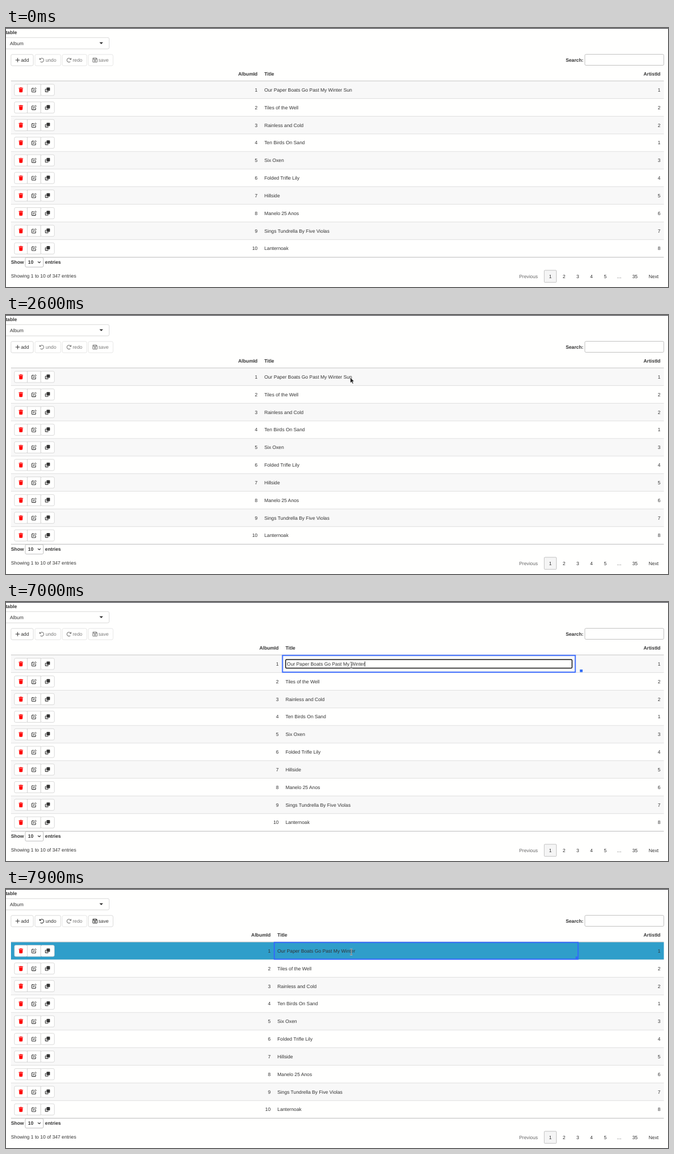
An HTML page that plays this animation: 1196x468 px, repeating every 8000 ms.

```html
<!DOCTYPE html>
<html lang="en">
<head>
<meta charset="utf-8">
<title>Editable table</title>
<style>
html, body { margin: 0; width: 100%; height: 100%; overflow: hidden; background: #fffffe; }
svg { display: block; width: 1196px; height: 468px; }
text {
  font: 8.73px "Liberation Sans", Arial, sans-serif;
  fill: #333;
  text-rendering: geometricPrecision;
  white-space: pre;
}
.b { font-weight: bold; }
.end { text-anchor: end; }
.mid { text-anchor: middle; }
.box { fill: #fffffe; stroke: #ccc; stroke-width: .75; }
.field { stroke: #aaa; }
.ico { fill: #333; }
.pen { fill: none; stroke: #333; stroke-width: 1.1; stroke-linejoin: round; }
.red { fill: #f00; }
.off { opacity: .65; }
.mark { fill: none; stroke: #36f; stroke-width: 1.9; }
.handle { fill: #316cf5; }
</style>
</head>
<body>
<svg id="stage" viewBox="0 0 1196 468" xmlns="http://www.w3.org/2000/svg">
  <defs>
    <g id="trash" class="red">
      <path d="M-3.9-3.9h2.3l.4-.7h2.4l.4.7h2.3v1.2h-7.8z"/>
      <path d="M-3.3-2.2h6.6l-.4 5.8q-.1.8-.9.8h-4q-.8 0-.9-.8z"/>
    </g>
    <g id="edit" class="pen">
      <path d="M-.4-3h-2.5q-1 0-1 1v4.9q0 1 1 1h4.9q1 0 1-1v-2.5"/>
      <path d="M-1.4 1.4l.4-1.9 3.6-3.6 1.5 1.5-3.6 3.6z" stroke-width=".9"/>
    </g>
    <g id="clone" class="ico">
      <rect x="-1.7" y="-4.3" width="6.1" height="6.1" rx="1"/>
      <path d="M-2.5-1.8h-.9q-1 0-1 1v4q0 1 1 1h4q1 0 1-1v-.8h-1.2v.6h-3.6v-3.6h.7z"/>
    </g>
    <path id="plus" class="pen" stroke-width="1.3" d="M-3.8 0h7.6M0-3.8v7.6"/>
    <path id="undo" class="pen" stroke-width="1.2" d="M-3.7-3.8v2.8h2.8M-3.2-1.3A3.6 3.6 0 1 1-2.4 2.6"/>
    <use id="redo" href="#undo" transform="scale(-1 1)"/>
    <g id="save" class="pen">
      <path d="M-3-3.8h5l1.8 1.8v4.9q0 .9-.9.9h-5.9q-.9 0-.9-.9v-5.8q0-.9.9-.9zM-2.1-3.6v2.5h4v-2.5"/>
      <circle cy="1.4" r=".8"/>
    </g>
  </defs>
</svg>
<script>
const NS = 'http://www.w3.org/2000/svg';
const stage = document.getElementById('stage');
const LOOP = 8000, TOP = 95.8, ROW = 31.83;
const FULL = 'Our Paper Boats Go Past My Winter Sun';
const titles = [FULL, 'Tiles of the Well', 'Rainless and Cold', 'Ten Birds On Sand', 'Six Oxen',
  'Folded Trifle Lily', 'Hillside', 'Manelo 25 Anos', 'Sings Tundrella By Five Violas', 'Lanternoak'];
const artists = [1, 2, 2, 1, 3, 4, 5, 6, 7, 8];

function add(tag, attrs, parent = stage) {
  const el = document.createElementNS(NS, tag);
  for (const k in attrs) el.setAttribute(k, attrs[k]);
  return parent.appendChild(el);
}
const rect = (x, y, width, height, attrs, parent) => add('rect', { x, y, width, height, ...attrs }, parent);
const path = (d, attrs, parent) => add('path', { d, ...attrs }, parent);
const icon = (name, x, y, parent) => add('use', { href: '#' + name, transform: `translate(${x} ${y})` }, parent);
function label(s, x, y, cls = '', parent = stage) {
  const el = add('text', { x, y, class: cls }, parent);
  el.textContent = s;
  return el;
}
const show = (el, on) => el.setAttribute('visibility', on ? 'visible' : 'hidden');
const move = (el, x, y) => el.setAttribute('transform', `translate(${x} ${y})`);

// Page head
rect(0, 0, 1196, 1.2, { fill: '#3b3b40' });
label('table', -.6, 10.5, 'b');
rect(-5, 17.3, 191.4, 20.5, { class: 'box', rx: 2.5 });
label('Album', 7, 30.8);
path('M168.8 25.8h6.6l-3.3 3.4z', { class: 'ico' });

// Toolbar
function button(name, x, w, iconX, textX) {
  const g = add('g', {});
  rect(x, 47.8, w, 20.4, { class: 'box', rx: 2.5 }, g);
  icon(name, iconX, 58, g);
  label(name === 'plus' ? 'add' : name, textX, 61, '', g);
  return g;
}
button('plus', 9, 40.3, 21, 27);
const undo = button('undo', 52.3, 46.6, 64.5, 71.4);
const redo = button('redo', 101.7, 44.3, 113.8, 120.4);
const save = button('save', 148.8, 44.6, 160.8, 167);
redo.setAttribute('class', 'off');
label('Search:', 1011.2, 60.6, 'b');
rect(1045.8, 47.6, 142.6, 19.8, { class: 'box field', rx: 2 });

// Table
for (let i = 0; i < 10; i += 2) rect(9, TOP + i * ROW, 1179.5, ROW, { fill: '#f8f8f8' });
for (let i = 1; i < 10; i++) rect(9, TOP + i * ROW - .4, 1179.5, .75, { fill: '#d6d6d6' });
const picked = rect(9, TOP + .3, 1179.5, ROW - .6, { fill: '#2f9eca' });
rect(9, TOP - .6, 1179.5, 1, { fill: '#c4c4c4' });
rect(9, TOP + 10 * ROW - .4, 1179.5, 1, { fill: '#b8b8b8' });
label('ArtistId', 1182.3, 86.3, 'b end');

const cols = add('g', {});
label('AlbumId', 454.4, 86.3, 'b end', cols);
label('Title', 466.7, 86.3, 'b', cols);
let firstTitle;
titles.forEach((title, i) => {
  const mid = TOP + (i + .5) * ROW, base = mid + 3.2;
  [[15.2, 23.6], [38.6, 24.3], [62.8, 24.6]].forEach(([x, w], k) => {
    rect(x, mid - 10.1, w, 20.4, { class: 'box', rx: k === 1 ? 0 : 2.5 });
  });
  icon('trash', 26.9, mid + .2);
  icon('edit', 50.6, mid + .2);
  icon('clone', 75, mid + .1);
  label(i + 1, 454.4, base, 'end', cols);
  const cell = label(title, 466.7, base, '', cols);
  if (!i) firstTitle = cell;
  label(artists[i], 1182.3, base, 'end');
});

// Cell editing
const outline = rect(461, 96.5, 580, 30.3, { class: 'mark' });
const handle = rect(0, 122, 4.9, 4.7, { class: 'handle' });
const editor = add('g', {});
rect(505.3, 103.9, 517.3, 15.6, { fill: '#fffffe', stroke: '#101010', 'stroke-width': 1.5, rx: 1.6 }, editor);
const typed = label(FULL, 507.6, TOP + ROW / 2 + 3.2, '', editor);
const caret = rect(0, 107.3, .9, 9.4, { fill: '#222' }, editor);

// Table foot
label('Show', 9, 426.4, 'b');
rect(34.8, 414.8, 32.6, 17.2, { class: 'box field', rx: 2 });
label('10', 39.8, 426.4, 'b');
path('M57.6 422l2.4 2.4 2.4-2.4', { class: 'pen' });
label('entries', 70.6, 426.4, 'b');
label('Showing 1 to 10 of 347 entries', 9, 451.4);
label('Previous', 927, 452).style.fill = '#666';
rect(972.4, 437.8, 22, 21.8, { fill: '#f5f5f5', stroke: '#b0b0b0', 'stroke-width': .75, rx: 1.2 });
[['1', 983.4], ['2', 1008.2], ['3', 1033], ['4', 1057.8], ['5', 1082.6], ['…', 1107.8], ['35', 1136.3], ['Next', 1170]]
  .forEach(([s, x]) => label(s, x, 452, 'mid'));

// Pointers
const arrow = path('M0 0V9.8L2.3 7.7 4 11.3 5.7 10.5 4.1 7.1H7.1z',
  { fill: '#222', stroke: '#fff', 'stroke-width': .6 });
const beam = add('g', {});
const beamShape = 'M-2.2-5.2Q0-5.2 0-4.2 0-5.2 2.2-5.2M0-4.4V4.4M-2.2 5.2Q0 5.2 0 4.2 0 5.2 2.2 5.2';
path(beamShape, { fill: 'none', stroke: '#fff', 'stroke-width': 1.8, opacity: .75 }, beam);
path(beamShape, { fill: 'none', stroke: '#444', 'stroke-width': .8 }, beam);

// [time, x, y] of the arrow tip
const route = [[600, 45, 5], [800, 243, 105], [1000, 413, 151], [1400, 588, 143], [1800, 606, 121],
  [2200, 616, 108], [2400, 616, 108], [2600, 622, 113], [3200, 622, 113], [3300, 622.6, 114]];

function along(t) {
  const n = route.findIndex(p => p[0] > t);
  if (n < 0) return route[route.length - 1].slice(1);
  if (n === 0) return route[0].slice(1);
  const [a, b] = [route[n - 1], route[n]];
  const k = (t - a[0]) / (b[0] - a[0]);
  return [a[1] + (b[1] - a[1]) * k, a[2] + (b[2] - a[2]) * k];
}

const between = (t, a, b) => t >= a && t < b;
const erasures = [5900, 6200, 6300, 6400];

function draw(now) {
  const t = Math.floor(now % LOOP / 100) * 100;
  const editing = between(t, 4700, 7300), done = t >= 7300, saved = t >= 7400;

  move(cols, editing ? 38.2 : done ? 23.6 : 0, 0);
  firstTitle.textContent = done ? FULL.slice(0, -4) : FULL;
  show(firstTitle, !editing);
  show(picked, saved);
  undo.setAttribute('class', saved ? '' : 'off');
  save.setAttribute('class', saved ? '' : 'off');

  const [left, right] = editing ? [499.5, 1028.5] : done ? [484.7, 1033.5] : [461, 1041];
  outline.setAttribute('x', left);
  outline.setAttribute('width', right - left);
  show(outline, t >= 4400);
  handle.setAttribute('x', saved ? 1029 : 1036.8);
  show(handle, t >= 3600);

  const cut = erasures.filter(e => t >= e).length;
  typed.textContent = FULL.slice(0, FULL.length - cut);
  caret.setAttribute('x', 507.4 + typed.getComputedTextLength());
  show(editor, editing);
  show(caret, editing && !between(t, 5200, 5800) && !between(t, 6400, 7000));

  move(arrow, ...along(t));
  show(arrow, between(t, 600, 3600));
  move(beam, 623.8, between(t, 5300, 7300) || t >= 7900 ? 113.7 : 114.8);
  show(beam, t >= 3600);
}

const start = performance.now();
function tick() {
  draw(performance.now() - start);
  requestAnimationFrame(tick);
}
tick();
</script>
</body>
</html>
```
